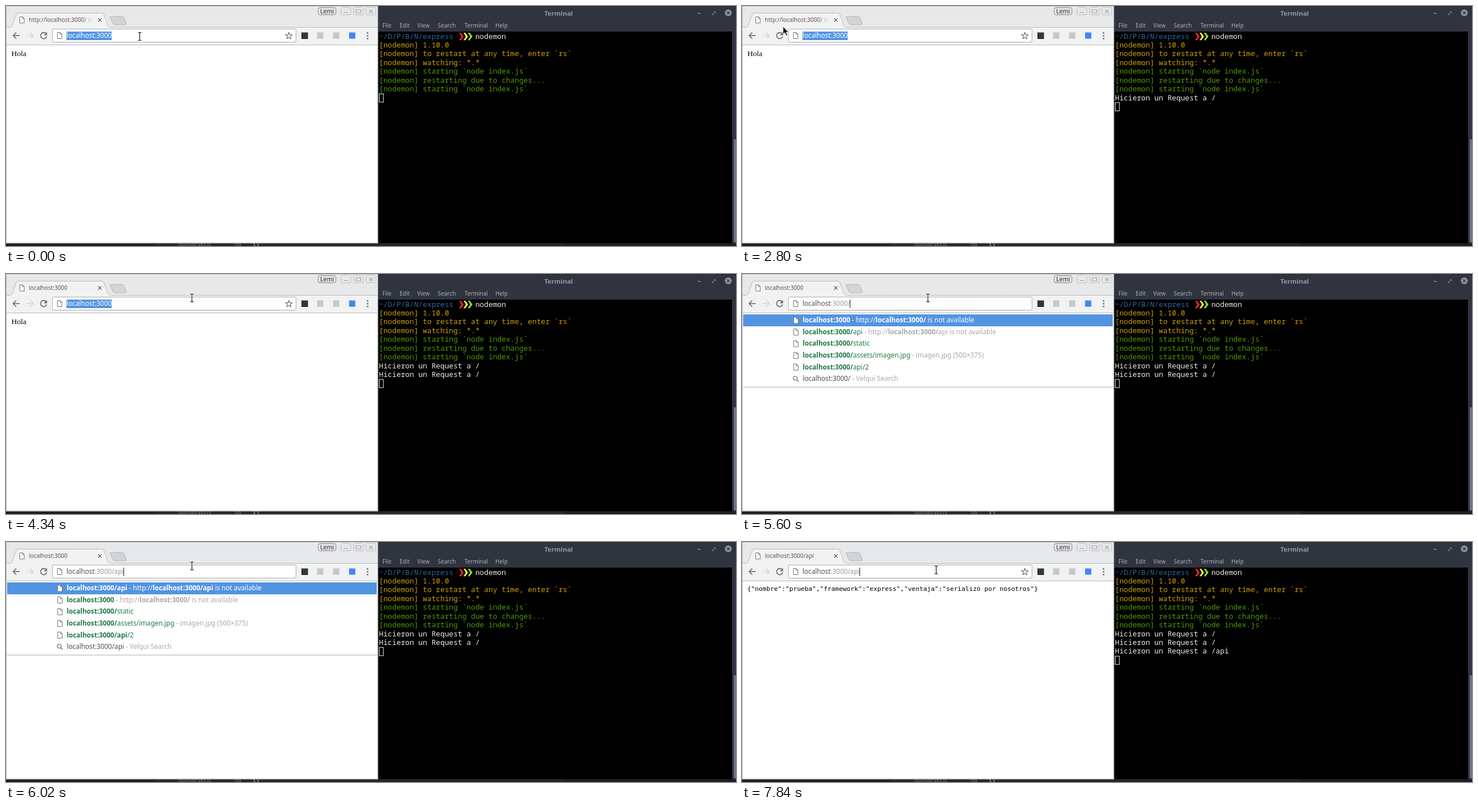
An HTML page for the animation above (8 s loop, 1280 px wide and 422 px high).

```html
<!DOCTYPE html>
<html lang="es">
<head>
<meta charset="utf-8">
<title>Express demo</title>
<style>
  html, body { margin: 0; width: 100%; height: 100%; overflow: hidden; background: #1d1f25; }
  svg { display: block; width: 100vw; height: 100vh; }
  text { white-space: pre; }
  .ui { font-family: "Noto Sans", "Open Sans", sans-serif; font-size: 10px; fill: #555; }
  .bar { font-size: 11.7px; }
  .bold { font-weight: 700; }
  .menu { fill: #a9adb6; }
  .term { font-family: "Noto Sans Mono", monospace; font-size: 12.8px; fill: #eeeeec; }
  .json { font-family: "DejaVu Sans Mono", monospace; font-size: 11.15px; }
  .serif { font-family: "Liberation Serif", Times, serif; font-size: 13.5px; }
  .yellow { fill: #c9a00a; }
  .green { fill: #4e9a06; }
  .blue { fill: #3465a4; }
  .host { fill: #4d4d4d; }
  .rest { fill: #999; }
  .picked { fill: #fff; }
  .link { fill: #1f7a45; }
  .note { fill: #a8a8a8; }
  .line { fill: none; stroke: #666; stroke-width: 1.6; }
  .thin { fill: none; stroke: #bdbfc2; }
</style>
</head>
<body>
<svg viewBox="0 0 1280 422" preserveAspectRatio="none">
  <defs>
    <linearGradient id="fade" gradientUnits="userSpaceOnUse" x1="40" x2="154" y1="0" y2="0">
      <stop offset=".82" stop-color="#555"/>
      <stop offset="1" stop-color="#555" stop-opacity="0"/>
    </linearGradient>
    <linearGradient id="strip" x2="0" y2="1">
      <stop stop-color="#f0f1f2"/>
      <stop offset=".12" stop-color="#e6e7e9"/>
      <stop offset="1" stop-color="#e8e9eb"/>
    </linearGradient>
    <g id="sheet">
      <path d="M-3.8-5.5H1L4-2.4V5.5H-3.8Z" fill="#fff" stroke="#707070"/>
      <path d="M1-5.5V-2.4H4" fill="none" stroke="#707070"/>
    </g>
    <g id="lens" fill="none" stroke="#777" stroke-width="1.4">
      <circle cx="-1" cy="-1" r="3.4"/>
      <path d="M1.6 1.6L5 5"/>
    </g>
    <path id="chevron" d="M0 0H3.2L8 6.6L3.2 13.2H0L4 6.6Z"/>
  </defs>

  <!-- desktop behind the windows -->
  <rect width="1280" height="422" fill="#1d1f25"/>
  <rect x="260" y="415" width="720" height="7" fill="#23262d"/>
  <text class="ui" x="302" y="422" style="fill:#737882">jsonserver.js</text>
  <text class="term" x="399" y="425" style="font-size:11px;fill:#737882">29  <tspan fill="#c3c8d0"> })</tspan></text>

  <!-- terminal -->
  <rect x="653" width="627" height="417" fill="#2f343f"/>
  <rect x="653" width="627" height="1" fill="#22262e"/>
  <rect x="653" y="45" width="620" height="372" fill="#000"/>
  <rect x="1276" y="234" width="4" height="182" rx="2" fill="#6d7380"/>
  <text class="ui bold" x="969" y="17" text-anchor="middle" style="font-size:11.4px;fill:#9299a6">Terminal</text>
  <g id="menu"></g>
  <g stroke="#8d939f" fill="none" stroke-width="1.4">
    <path d="M1213 13H1218"/>
    <path d="M1240.800 10.300H1243.600V13.100M1241.400 15H1238.800V12.300" stroke-width="1.200"/>
    <circle cx="1266.500" cy="12" r="6" fill="#8d939f" stroke="none"/>
    <path d="M1264.300 9.800L1268.700 14.200M1268.700 9.800L1264.300 14.200" stroke="#2f343f"/>
  </g>
  <g id="lines"></g>
  <use href="#chevron" x="794.500" y="47" fill="#e5282a"/>
  <use href="#chevron" x="802.200" y="47" fill="#fce94f"/>
  <use href="#chevron" x="809.900" y="47" fill="#8ae234"/>
  <rect id="block" x="654.500" width="7.200" height="14.600" fill="none" stroke="#eee"/>

  <!-- browser frame -->
  <rect width="652.500" height="417.500" fill="#b4b6b8"/>
  <rect x="1" y="1" width="650.500" height="415.500" fill="#f2f2f2"/>
  <rect x="1" y="1" width="650.500" height="36" fill="url(#strip)"/>
  <path d="M1 37.500H7C10 37 11 35 12 32L17.500 16C18.500 13 19 12.500 22 12.500H167C170 12.500 171 13 172 16L178 32C179 35 180 37 183 37.500H651.500" fill="#f2f2f2" stroke="#b8b9bb"/>
  <rect x="8" y="37" width="174" height="2" fill="#f2f2f2"/>
  <path d="M184 18.500H203Q206 18.500 207 21L211 31Q211.500 33 209 33H191Q188.500 33 187.500 31L182.500 20.500Q182 18.500 184 18.500Z" fill="#d3d4d5" stroke="#b5b6b8"/>
  <rect x="2" y="68" width="648.500" height="347" fill="#fff"/>
  <path d="M1 68.500H651" stroke="#b9b9b9"/>

  <rect x="547.500" y="2.500" width="31" height="13" rx="3" fill="#dfe0e2" stroke="#85888c"/>
  <text class="ui" x="563" y="13" text-anchor="middle" style="fill:#333;font-size:10.500px">Lemi</text>
  <g class="thin">
    <rect x="587.500" y="2.500" width="17" height="13" rx="2"/>
    <rect x="609.500" y="2.500" width="17" height="13" rx="2"/>
    <rect x="631.500" y="2.500" width="17" height="13" rx="2"/>
    <path d="M592 11.500H600M614 6.500H622V12H614ZM637 6.500L643 12.500M643 6.500L637 12.500" stroke="#a4a6aa" stroke-width="1.200"/>
  </g>

  <use id="favicon" href="#sheet" x="28" y="24.500"/>
  <path id="spin" class="line" d="M28 19.500A5 5 0 1 1 23 24.500"/>
  <text id="title" class="ui" x="40" y="28" style="fill:url(#fade)"></text>
  <path class="line" d="M161.500 21.500L167.500 27.500M167.500 21.500L161.500 27.500" style="stroke-width:1.300px"/>

  <!-- toolbar -->
  <path class="line" d="M24 52H13M18 46.500L12.500 52L18 57.500"/>
  <path class="line" d="M36 52H47M42 46.500L47.500 52L42 57.500" style="stroke:#d6d6d6"/>
  <circle id="hover" cx="66" cy="52" r="11" fill="#dcdcdc"/>
  <g id="reload">
    <path class="line" d="M70.300 48.600A5.400 5.400 0 1 0 71.300 53.500"/>
    <path d="M72 46V51.500H66.500Z" fill="#666"/>
  </g>
  <path id="stop" class="line" d="M61.500 47.500L70.500 56.500M70.500 47.500L61.500 56.500"/>
  <rect x="81.500" y="40.500" width="427" height="23" rx="2" fill="#fff" stroke="#adadad"/>
  <use href="#sheet" x="94" y="52"/>
  <path id="star" d="M496 46.500L497.600 50.400L501.700 50.700L498.600 53.400L499.500 57.400L496 55.200L492.500 57.400L493.400 53.400L490.300 50.700L494.400 50.400Z" fill="none" stroke="#666" stroke-width="1.100"/>
  <rect x="518" y="46.500" width="11.500" height="11.500" fill="#2a3740"/>
  <rect x="545.500" y="46.500" width="11" height="11" fill="#c6c6c6"/>
  <rect x="573.500" y="46.500" width="11" height="11" fill="#c6c6c6"/>
  <rect x="601.500" y="46.500" width="11" height="11" fill="#4285f4"/>
  <g fill="#666">
    <circle cx="634" cy="47.300" r="1.400"/>
    <circle cx="634" cy="52.300" r="1.400"/>
    <circle cx="634" cy="57.300" r="1.400"/>
  </g>
  <rect id="mark" y="45" height="15" fill="#5294e2"/>
  <text id="url" class="ui bar" x="106" y="56.300"></text>
  <rect id="caret" y="45" width="1" height="15" fill="#222"/>

  <!-- page -->
  <text id="hola" class="serif" x="9.500" y="87.500">Hola</text>
  <text id="json" class="json" x="9.200" y="86">{"nombre":"prueba","framework":"express","ventaja":"serializó por nosotros"}</text>
  <g id="drop">
    <rect x="2" y="198" width="648.500" height="1" fill="#c4c4c4"/>
    <rect x="2" y="199" width="648.500" height="2" fill="#eee"/>
    <rect x="2" y="69" width="648.500" height="129" fill="#fff"/>
    <rect x="2" y="71" width="648" height="21" fill="#5294e2"/>
    <g id="rows"></g>
  </g>

  <!-- pointers, drawn around their hot spot -->
  <g id="beam" fill="none">
    <path d="M-3-7H3M0-7V7M-3 7H3" stroke="#fff" stroke-width="3"/>
    <path d="M-3-7H-1L0-6L1-7H3M0-6V6M-3 7H-1L0 6L1 7H3" stroke="#111" stroke-width="1.200"/>
  </g>
  <path id="arrow" d="M0 0V13.500L3 10.800L5.300 16L7.700 15L5.500 10H9.500Z" fill="#111" stroke="#fff" stroke-width=".8"/>
</svg>

<script>
const LOOP = 8000, ROW = 15.43, BASE = 'localhost:3000';
const $ = id => document.getElementById(id);
const span = (cls, s) => s ? `<tspan class="${cls}">${s}</tspan>` : '';
const show = (id, on) => { $(id).style.display = on ? '' : 'none'; };

const requests = ['/', '/', '/api'];
const termLines = [
  ['blue', '~/D/P/B/N/express' + span('term', '     nodemon')],
  ['yellow', '[nodemon] 1.10.0'],
  ['yellow', '[nodemon] to restart at any time, enter `rs`'],
  ['yellow', '[nodemon] watching: *.*'],
  ['green', '[nodemon] starting `node index.js`'],
  ['green', '[nodemon] restarting due to changes...'],
  ['green', '[nodemon] starting `node index.js`'],
  ...requests.map(p => ['', 'Hicieron un Request a ' + p])
];
$('lines').innerHTML = termLines.map(([cls, s], i) =>
  `<text class="term" x="654" y="${57.6 + i * ROW}">${span(cls, s)}</text>`).join('');

const menu = { File: 660, Edit: 690, View: 721, Search: 757, Terminal: 804, Help: 858 };
$('menu').innerHTML = Object.entries(menu).map(([s, x]) =>
  `<text class="ui menu" x="${x}" y="37.600">${s}</text>`).join('');

// Suggestions: address | note, with the typed part in bold
function suggestions(typed) {
  const list = [
    BASE + `| - http://${BASE}/ is not available`,
    BASE + `/api| - http://${BASE}/api is not available`,
    BASE + '/static',
    BASE + '/assets/imagen.jpg| - imagen.jpg (500×375)',
    BASE + '/api/2'
  ];
  if (typed !== BASE + '/') list.unshift(...list.splice(1, 1));
  const match = new RegExp(`${typed}|${BASE}/?`, 'g');
  const bold = s => s.replace(match, m => span('bold', m));
  const rows = list.map((s, i) => {
    const [link, note = ''] = s.split('|');
    return i ? span('link', bold(link)) + span('note', bold(note)) : span('picked', bold(link + note));
  });
  rows.push(span('host', typed) + span('note', ' - Velqui Search'));
  return rows.map((s, i) => {
    const y = 81 + i * 20.55;
    return `<use href="#${i < 5 ? 'sheet' : 'lens'}" x="94.500" y="${y + .5}"/>` +
      `<text class="ui bar" x="106.500" y="${y + 4.3}">${s}</text>`;
  }).join('');
}

// sel: index where the selection begins, -1 for none
const start = {
  title: `http://${BASE}/ is`, url: BASE, sel: 0, caret: false, typed: '', page: 'hola',
  logs: 0, busy: false, loading: false, hover: false, ptr: 'beam', x: 234.5, y: 53.5
};
const beam = (x, y) => ({ ptr: 'beam', x, y });
const arrow = (x, y) => ({ ptr: 'arrow', x, y });
const api = BASE + '/api';

const steps = [
  [560, { sel: -1, busy: true, loading: true, logs: 1 }],
  [630, { busy: false, loading: false }],
  [1960, { caret: true }],
  [2030, { caret: false, sel: 0 }],
  [2450, { ptr: '' }],
  [2660, arrow(2, 2)],
  [2730, arrow(38, 20)],
  [2800, arrow(72, 36)],
  [2870, arrow(95, 46)],
  [2940, arrow(86, 50)],
  [3010, { ...arrow(73, 52), hover: true }],
  [3080, arrow(66, 53)],
  [3220, { sel: -1, loading: true }],
  [3290, { title: BASE, logs: 2 }],
  [3360, { loading: false }],
  [3430, { ...beam(120, 52), hover: false }],
  [3500, beam(220, 49)],
  [3570, beam(290, 46)],
  [4130, beam(315, 44)],
  [4200, beam(326, 42)],
  [4270, { caret: true }],
  [4340, { caret: false, sel: 0 }],
  [5040, { caret: true, sel: -1 }],
  [5600, { url: BASE + '/', typed: BASE + '/' }],
  [5810, { url: api, typed: BASE + '/a', sel: 16, caret: false }],
  [5950, { typed: BASE + '/ap', sel: 17 }],
  [6020, { typed: api, sel: -1, caret: true }],
  [6090, { logs: 3 }],
  [6510, { title: api, typed: '', page: 'json', caret: false }],
  [7000, beam(318.5, 45.5)],
  [7070, beam(323.5, 42)],
  [7280, beam(312, 45)],
  [7350, beam(300, 48)],
  [7420, beam(289.5, 50)],
  [7560, beam(312, 50)],
  [7630, beam(340.5, 49)],
  [7700, { sel: 0 }],
  [7840, { sel: -1, caret: true }]
];

function draw(s) {
  $('title').textContent = s.title;
  show('favicon', !s.busy);
  show('spin', s.busy);
  show('reload', !s.loading);
  show('stop', s.loading);
  show('hover', s.hover);

  const cut = s.sel < 0 ? s.url.length : s.sel, url = $('url');
  url.innerHTML = span('host', s.url.slice(0, Math.min(9, cut))) +
    span('rest', s.url.slice(9, cut)) + span('picked', s.url.slice(cut));
  const end = 106 + url.getComputedTextLength();
  const from = cut < s.url.length ? url.getStartPositionOfChar(cut).x : end;
  $('mark').setAttribute('x', from);
  $('mark').setAttribute('width', end - from);
  $('caret').setAttribute('x', Math.round(end - .3));
  show('caret', s.caret);

  show('star', !s.typed);
  show('drop', s.typed);
  if (s.typed) $('rows').innerHTML = suggestions(s.typed);
  show('hola', s.page === 'hola' && !s.typed);
  show('json', s.page === 'json');

  const used = termLines.length - requests.length + s.logs;
  [...$('lines').children].forEach((el, i) => { el.style.display = i < used ? '' : 'none'; });
  $('block').setAttribute('y', 46.4 + used * ROW);

  for (const id of ['beam', 'arrow']) {
    show(id, s.ptr === id);
    $(id).setAttribute('transform', `translate(${s.x} ${s.y})`);
  }
}

let shown = -1;
const began = performance.now();
function tick() {
  const t = (performance.now() - began) % LOOP;
  const count = steps.filter(([at]) => at <= t).length;
  if (count !== shown) {
    shown = count;
    draw(Object.assign({}, start, ...steps.slice(0, count).map(([, change]) => change)));
  }
  requestAnimationFrame(tick);
}
tick();
</script>
</body>
</html>
```
